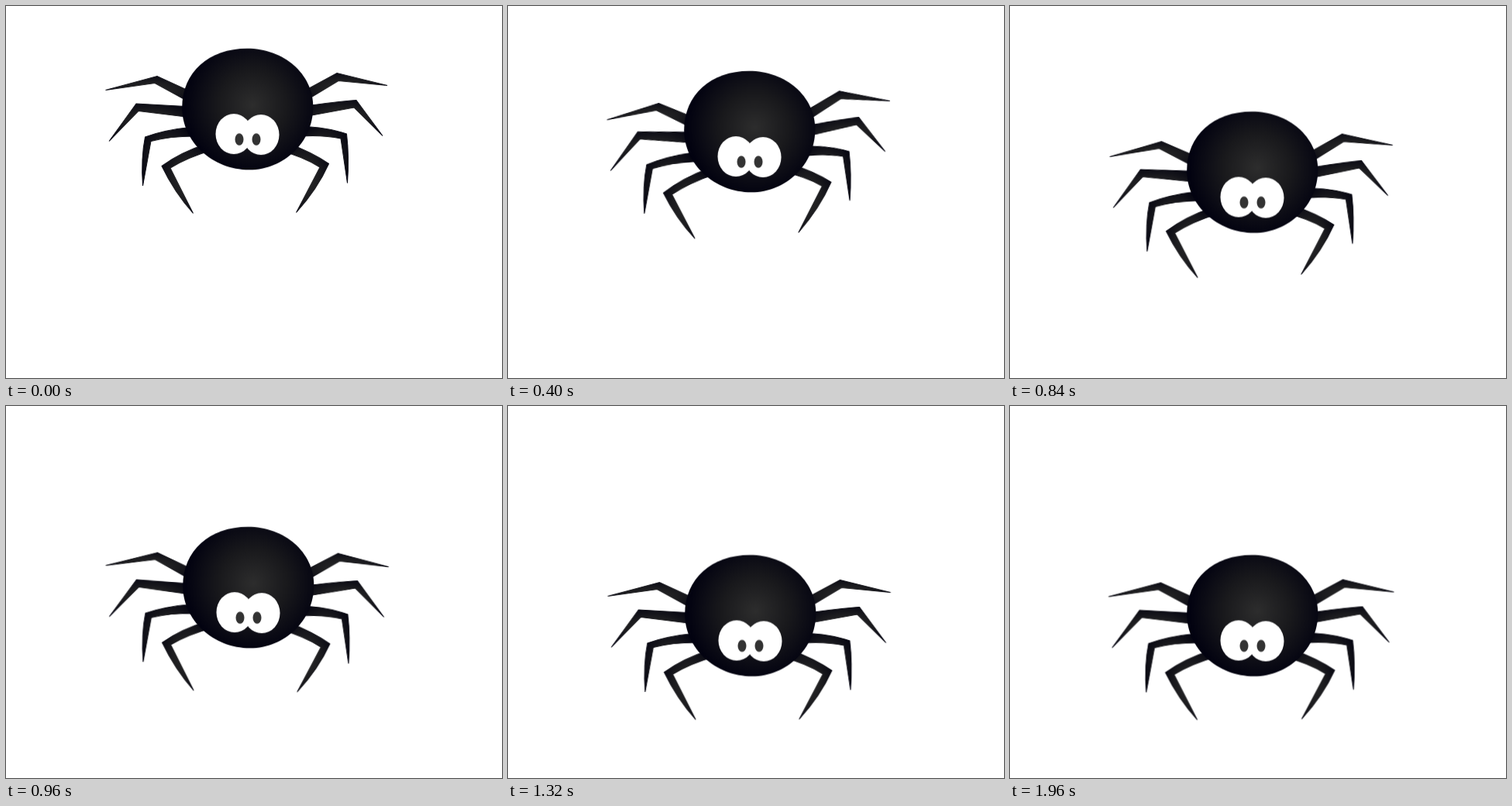
An HTML page without scripts that plays this animation: 640x480 px, repeating every 2 s.

```html
<!DOCTYPE html>
<html lang="en">
<head>
<meta charset="utf-8">
<title>Spider</title>
<style>
  html, body { margin: 0; width: 100%; height: 100%; overflow: hidden; background: #fff; }
  svg { display: block; width: 100vw; height: 100vh; }

  .spider { animation: drop 2s linear infinite; }
  .legs {
    transform-origin: 312px 0;
    animation: sway 2s cubic-bezier(.37, 0, .63, 1) infinite;
  }

  @keyframes drop {
    0% { transform: translate(0, 0); }
    10% { transform: translate(0, 13px); }
    20% { transform: translate(0, 29px); }
    28% { transform: translate(.5px, 45px); }
    34% { transform: translate(1px, 57px); }
    41% { transform: translate(1px, 78px); }
    48% { transform: translate(1px, 101px); }
    56% { transform: translate(1px, 130px); }
    59%, 100% { transform: translate(1px, 137.5px); }
  }

  /* the stride slows a little after landing */
  @keyframes sway {
    0%, 100% { transform: skewY(0deg) scaleX(1); }
    2.7%, 13.4%, 24%, 34.1%, 45.6%, 57.2%, 69.2%, 82.7%, 95% { transform: skewY(4.4deg) scaleX(1.004); }
    8.1%, 18.8%, 29.1%, 39.9%, 51.4%, 62.9%, 75.9%, 88.9% { transform: skewY(-4deg) scaleX(1.004); }
    98% { transform: skewY(0deg) scaleX(1.013); }
  }
</style>
</head>
<body>
<svg viewBox="0 0 640 480">
  <defs>
    <radialGradient id="skin" gradientUnits="userSpaceOnUse" cx="318" cy="127" r="88">
      <stop offset="0" stop-color="#2d2d2d"/>
      <stop offset=".5" stop-color="#19191c"/>
      <stop offset="1" stop-color="#020210"/>
    </radialGradient>
    <radialGradient id="limb" cx=".5" cy=".5" r=".6">
      <stop offset="0" stop-color="#2b2b2b"/>
      <stop offset=".5" stop-color="#1c1c1f"/>
      <stop offset="1" stop-color="#040410"/>
    </radialGradient>
  </defs>

  <g class="spider">
    <g class="legs" fill="url(#limb)" stroke="url(#limb)">
      <path d="M128.500 108.500L195 90.500L242 112V127L192 99.500Z"/>
      <path d="M133 174.500L168 126L240 130V144L171 135.500Z"/>
      <path d="M176.500 232Q174 196 179.500 169Q205 159.500 242 156V168Q212 168 187 174.500Z"/>
      <path d="M241.500 267.500Q217 240 201 206.500Q225 188.500 260 177.500L266 186Q235 195 212 209Z"/>
      <path d="M492 102.500L427 86.500L380 112V126L429 96.500Z"/>
      <path d="M486 167.500L452 121.500Q425 123.500 384 129.500V143L449 131Z"/>
      <path d="M440.500 228.500Q443 194 439.500 165Q415 156.500 378 155V168Q410 166 432 171Z"/>
      <path d="M374.500 266.500Q402 236 416.500 203.500Q395 188.500 362 176.500L352 186Q385 195 405 208Z"/>
    </g>
    <path fill="url(#skin)" d="M311 54.700C358 54.700 396.300 87 396.300 130C396.300 176 358 211.300 314 211.300C266 211.300 227.200 175 227.200 131C227.200 85 262 54.700 311 54.700Z"/>
    <g fill="#fff">
      <ellipse cx="294" cy="165" rx="23.500" ry="26"/>
      <ellipse cx="329" cy="166" rx="23.500" ry="26"/>
    </g>
    <g fill="#333">
      <ellipse cx="301" cy="172" rx="5.500" ry="7.800"/>
      <ellipse cx="323" cy="172" rx="5.500" ry="7.800"/>
    </g>
  </g>
</svg>
</body>
</html>
```
